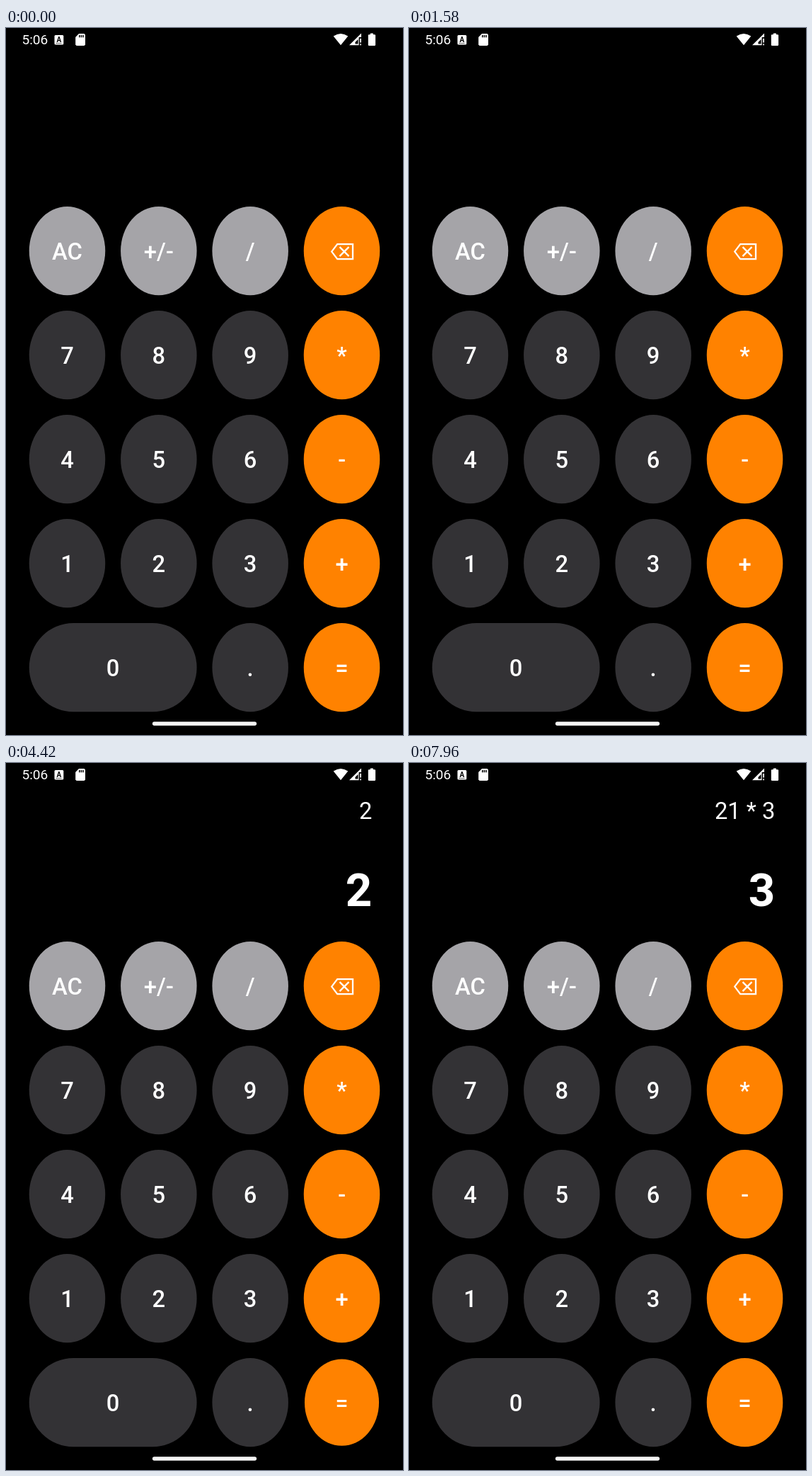
Write an HTML page with a canvas that moves like this. It is 561x998 px and loops after 8 s.

```html
<!DOCTYPE html>
<html lang="en">
<head>
<meta charset="utf-8">
<title>Calculator</title>
<style>
html, body { margin: 0; width: 100%; height: 100%; overflow: hidden; background: #000; }
canvas { display: block; width: 561px; height: 998px; }
</style>
</head>
<body>
<canvas id="stage"></canvas>
<script>
const W = 561, H = 998, LOOP = 8000;
const LIGHT = '#a5a4a8', DARK = '#333235', ORANGE = '#ff8200', WHITE = '#ffffff';

// Layout in density-independent units of a 411.43-unit wide screen.
const DP = W / 411.43;
const PAD = 24 * DP, GAP = 16 * DP;
const KEY_W = (W - 2 * PAD - 3 * GAP) / 4, KEY_H = 125.2;
const KEYS_TOP = H - PAD - 5 * KEY_H - 4 * GAP;
const TEXT_RIGHT = W - PAD - 8 * DP;
const LABEL = 24 * DP, VALUE = 48 * DP;

const canvas = document.getElementById('stage');
const ctx = canvas.getContext('2d');
const ratio = window.devicePixelRatio || 1;
canvas.width = W * ratio;
canvas.height = H * ratio;

const ROWS = [
  ['AC', '+/-', '/', 'back'],
  ['7', '8', '9', '*'],
  ['4', '5', '6', '-'],
  ['1', '2', '3', '+'],
  ['0', null, '.', '=']
];

// Each tap sets the expression and the large value as the finger lifts.
const TAPS = [
  { at: 1865, key: '1', line: '1', value: '1' },
  { at: 2700, key: '+', line: '1 +', value: '0' },
  { at: 3535, key: '1', line: '1 + 1', value: '1' },
  { at: 4370, key: '=', line: '2', value: '2' },
  { at: 5205, key: '1', line: '21', value: '21' },
  { at: 6100, key: '*', line: '21 *', value: '0' },
  { at: 7000, key: '3', line: '21 * 3', value: '3' }
];

const clamp = x => Math.max(0, Math.min(1, x));

function keyScale(key, t) {
  let press = 0;
  for (const tap of TAPS) {
    if (tap.key !== key) continue;
    const d = t - tap.at;
    press = Math.max(press, Math.min(clamp((d + 150) / 100), clamp((190 - d) / 100)));
  }
  return 1 - 0.023 * press * press * (3 - 2 * press);
}

function text(str, x, y, size, weight, align) {
  ctx.font = `${weight} ${size}px Roboto, sans-serif`;
  ctx.textAlign = align;
  ctx.fillText(str, x, y);
}

function roundRect(x, y, w, h, r) {
  ctx.beginPath();
  ctx.roundRect(x, y, w, h, r);
  ctx.fill();
}

function polygon(...pts) {
  ctx.beginPath();
  pts.forEach(([x, y]) => ctx.lineTo(x, y));
  ctx.closePath();
}

function backspace() {
  ctx.strokeStyle = WHITE;
  ctx.lineWidth = 2.3;
  ctx.lineJoin = 'miter';
  polygon([-14.3, 1], [-6.3, -9.5], [15.5, -9.5], [15.5, 11.5], [-6.3, 11.5]);
  ctx.stroke();
  ctx.beginPath();
  ctx.moveTo(-3, -5.5);
  ctx.lineTo(10, 7.5);
  ctx.moveTo(10, -5.5);
  ctx.lineTo(-3, 7.5);
  ctx.stroke();
}

function drawKey(key, row, col, t) {
  const wide = key === '0';
  const w = wide ? 2 * KEY_W + GAP : KEY_W, h = KEY_H;
  const s = keyScale(key, t);
  ctx.save();
  ctx.translate(PAD + col * (KEY_W + GAP) + w / 2, KEYS_TOP + row * (h + GAP) + h / 2);
  ctx.scale(s, s);
  ctx.fillStyle = col === 3 ? ORANGE : row === 0 ? LIGHT : DARK;
  if (wide) {
    roundRect(-w / 2, -h / 2, w, h, h / 2);
  } else {
    ctx.beginPath();
    ctx.ellipse(0, 0, w / 2, h / 2, 0, 0, 2 * Math.PI);
    ctx.fill();
  }
  ctx.fillStyle = WHITE;
  if (key === 'back') backspace();
  else text(key, 0, 12.7, LABEL, 500, 'center');
  ctx.restore();
}

function statusBar() {
  ctx.fillStyle = WHITE;
  text('5:06', 22.5, 23, 14 * DP, 400, 'left');

  // Keyboard badge
  roundRect(68.5, 10, 12.8, 13.5, 1.5);
  ctx.fillStyle = '#000';
  text('A', 74.9, 19.6, 10, 700, 'center');
  for (let x = 71; x < 79; x += 2) ctx.fillRect(x, 21, 1.1, 1);

  // Memory card
  ctx.fillStyle = WHITE;
  polygon([103, 8], [110.5, 8], [112, 9.5], [112, 23.5], [110.5, 25], [99.7, 25], [98.2, 23.5], [98.2, 13]);
  ctx.fill();
  ctx.fillStyle = '#000';
  for (let i = 0; i < 3; i++) ctx.fillRect(103 + i * 2.6, 10, 1.5, 3.3);

  // Wi-Fi
  ctx.fillStyle = WHITE;
  ctx.beginPath();
  ctx.moveTo(473, 24.3);
  ctx.lineTo(462.7, 11.6);
  ctx.quadraticCurveTo(473, 4.2, 483.3, 11.6);
  ctx.closePath();
  ctx.fill();

  // Mobile signal
  polygon([485, 24.3], [502, 7.6], [502, 13], [498.6, 13], [498.6, 24.3]);
  ctx.fill();
  ctx.fillStyle = '#000';
  polygon([493.5, 20], [497.5, 16], [497.5, 22.5], [493.5, 22.5]);
  ctx.fill();
  ctx.fillStyle = WHITE;
  ctx.fillRect(500.2, 14.8, 1.7, 5.8);
  ctx.fillRect(500.2, 22.4, 1.7, 1.9);

  // Battery
  roundRect(514.8, 7.6, 4.2, 3, 0.4);
  roundRect(511.8, 9.2, 10.3, 15.8, 1.3);
}

function draw(t) {
  ctx.setTransform(ratio, 0, 0, ratio, 0, 0);
  ctx.fillStyle = '#000';
  ctx.fillRect(0, 0, W, H);
  statusBar();

  const shown = TAPS.filter(tap => tap.at <= t).pop();
  if (shown) {
    ctx.fillStyle = WHITE;
    text(shown.line, TEXT_RIGHT, 79, LABEL, 400, 'right');
    text(shown.value, TEXT_RIGHT, 202, VALUE, 700, 'right');
  }

  ROWS.forEach((keys, row) => keys.forEach((key, col) => {
    if (key) drawKey(key, row, col, t);
  }));

  ctx.fillStyle = '#f4f4f4';
  roundRect(W / 2 - 54 * DP, 979.2, 108 * DP, 4 * DP, 2 * DP);
}

const start = performance.now();
function frame() {
  draw((performance.now() - start) % LOOP);
  requestAnimationFrame(frame);
}
frame();
</script>
</body>
</html>
```
